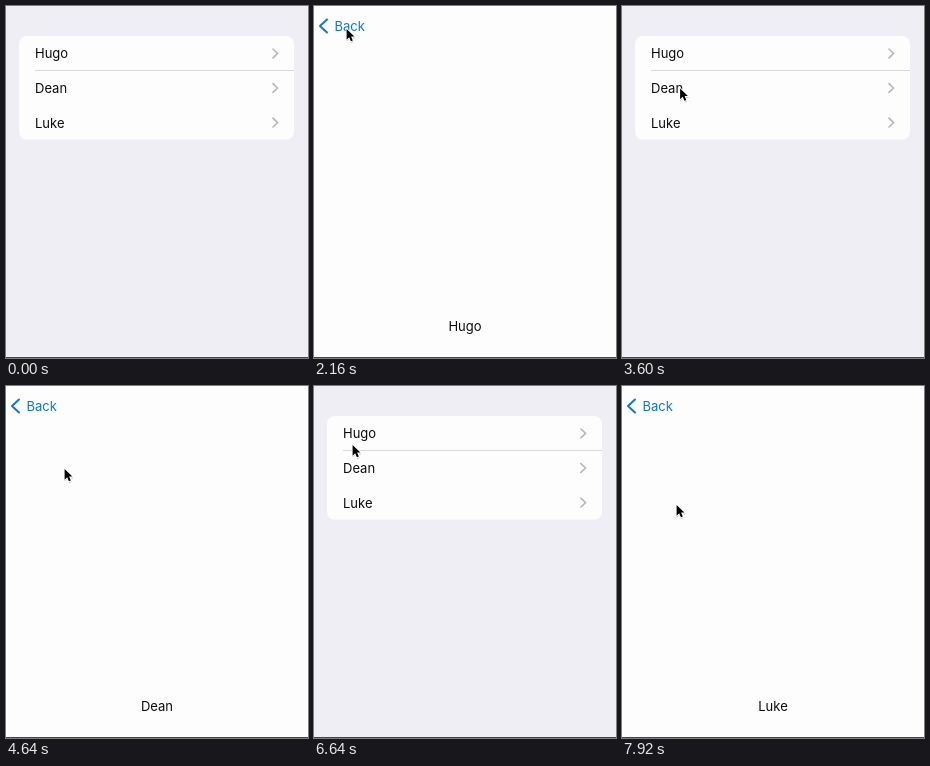
Write an HTML page that moves like this. It is 302 px wide and 352 px high and loops after 8 s.

```html
<!DOCTYPE html>
<html lang="en">
<head>
<meta charset="utf-8">
<title>List navigation</title>
<style>
  html, body { margin: 0; width: 100%; height: 100%; overflow: hidden; background: #efeef4; }
  svg { display: block; width: 302px; height: 352px; }
  text { font: 400 13px Inter, "Liberation Sans", sans-serif; fill: #0b0b0b; }
  .chevron { fill: none; stroke-linecap: round; stroke-linejoin: round; }
</style>
</head>
<body>
<svg viewBox="0 0 302 352">
  <defs>
    <clipPath id="card"><rect x="13" y="30" width="275" height="103.8" rx="8"/></clipPath>
  </defs>
  <rect width="302" height="352" fill="#efeef4"/>
  <g id="list">
    <g clip-path="url(#card)">
      <rect x="13" y="30" width="275" height="103.8" fill="#fdfdfd"/>
      <rect x="29" y="64" width="259" height="1" fill="#d9d9da"/>
      <rect id="pick" x="13" width="275" height="35" fill="#c8c8cd"/>
    </g>
    <g id="rows"></g>
  </g>
  <rect id="dim" width="302" height="352"/>
  <g id="page">
    <rect width="304" height="352" fill="#fdfdfd"/>
    <text id="label" x="151" y="324.6" text-anchor="middle"></text>
  </g>
  <g id="back">
    <path class="chevron" d="M13 13.5L6 20L13 26.5" stroke="currentColor" stroke-width="2"/>
    <text x="20.5" y="24.6" style="fill: currentColor">Back</text>
  </g>
  <rect y="351" width="302" height="1" fill="#444644"/>
  <g id="cursor">
    <circle id="ring" r="17" fill="none" stroke="#8a8a8e" stroke-width="2"/>
    <g transform="translate(.6 .9)">
      <path d="M.3 1.2V12.2L2.9 9.9L4.7 14L6.7 13.1L5 9.2H8.4Z" fill="#000" stroke="#000" opacity=".16"/>
      <path d="M0 0V10.8L2.6 8.4L4.3 12.4L6.2 11.6L4.5 7.7H7.8Z" fill="#000" stroke="#fff" stroke-width="1.6" stroke-linejoin="round" paint-order="stroke"/>
    </g>
  </g>
</svg>
<script>
const LOOP = 8000, STEP = 80, WIDTH = 302, ROW = 34.6, TOP = 30;
const names = ["Hugo", "Dean", "Luke"];

// Row, push start and pop start of each visit
const visits = [
  { row: 0, push: 880, pop: 2560 },
  { row: 1, push: 4080, pop: 5600 },
  { row: 2, push: 7360, pop: Infinity }
];
const presses = [[720, 880], [2400, 2560], [3920, 4080]];

// Pointer stops: time, x, y
const path = [
  [80, 1, 80], [280, 33, 67], [480, 53, 58], [1760, 53, 58],
  [1960, 45, 38], [2160, 32, 22], [2400, 22.5, 20.5], [2800, 22.5, 20.5],
  [3360, 49, 64], [3600, 57.5, 81.5], [3760, 58, 82], [4800, 58, 82],
  [5080, 34, 45], [5360, 10.5, 18], [5920, 10.5, 18], [6400, 25, 23],
  [6640, 38, 58], [6880, 49, 96], [7120, 54, 118], [LOOP, 54, 118]
];

const $ = id => document.getElementById(id);
const clamp = x => Math.max(0, Math.min(1, x));
const move = (el, x, y = 0) => el.setAttribute("transform", `translate(${x.toFixed(2)} ${y.toFixed(2)})`);

// Critically damped spring from 0 to 1, ms
function spring(ms) {
  const k = Math.max(0, ms) * 0.01826;
  return k > 9 ? 1 : 1 - (1 + k) * Math.exp(-k);
}

function pointer(t) {
  const i = path.findIndex(p => p[0] > t);
  const [t0, x0, y0] = path[i - 1], [t1, x1, y1] = path[i];
  const u = (t - t0) / (t1 - t0);
  return [x0 + (x1 - x0) * u, y0 + (y1 - y0) * u];
}

$("rows").innerHTML = names.map((name, i) => {
  const y = TOP + ROW * (i + 0.5);
  return `<text x="29" y="${y + 5.05}">${name}</text>
    <path class="chevron" d="M266.9 ${y - 4.3}l4.7 4.4l-4.7 4.4" stroke="#b7b7ba" stroke-width="1.6"/>`;
}).join("");

function draw(t) {
  const visit = visits.filter(v => t >= v.push).pop();
  let shown = 0, picked = 0, back = 0;
  if (visit) {
    const since = t - visit.push, left = t - visit.pop;
    if (left < 0) {
      shown = spring(since - 20);
      picked = 1;
      back = clamp((since - 20) / 130);
    } else {
      shown = 1 - spring(left - 20);
      picked = 1 - clamp((left - 100) / 500);
      back = 1 - clamp(left / 240);
    }
    $("pick").setAttribute("y", TOP + ROW * visit.row);
    $("label").textContent = names[visit.row];
  }
  move($("list"), -0.3 * WIDTH * shown);
  move($("page"), WIDTH * (1 - shown));
  $("page").setAttribute("visibility", shown > 0.001 ? "visible" : "hidden");
  $("dim").setAttribute("opacity", 0.12 * shown);
  $("pick").setAttribute("opacity", picked);
  $("back").setAttribute("opacity", back);
  $("back").setAttribute("color", shown > 0.97 ? "#1277d0" : "#0a7df0");

  $("cursor").setAttribute("visibility", t < 80 ? "hidden" : "visible");
  if (t >= 80) move($("cursor"), ...pointer(t));
  const pressed = presses.some(([a, b]) => t >= a && t < b);
  $("ring").setAttribute("opacity", pressed ? 1 : 0);
}

function tick() {
  const t = performance.now() % LOOP;
  draw(Math.floor(t / STEP) * STEP);
  requestAnimationFrame(tick);
}
tick();
</script>
</body>
</html>
```
